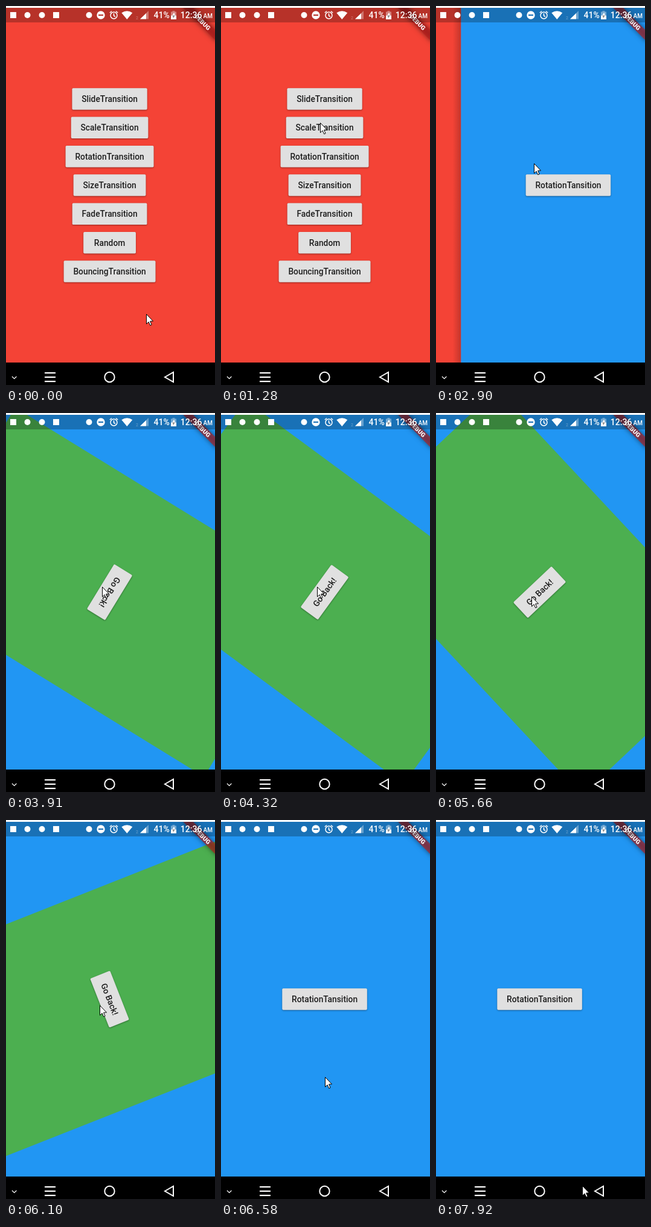
An HTML page with a canvas for the animation above (8 s loop, 346x624 px).

```html
<!DOCTYPE html>
<html lang="en">
<head>
<meta charset="utf-8">
<title>Page transitions</title>
<style>
  html, body { margin: 0; width: 100%; height: 100%; overflow: hidden; background: #fff; }
  canvas { display: block; width: 346px; height: 624px; }
</style>
</head>
<body>
<canvas id="stage"></canvas>
<script>
const W = 346, H = 624, LOOP = 8000;
const STEP = 77;                         // screen refresh while something moves
const DP = 584 / 592;                    // app is 360 x 592 dp
const APP = { x: -6, y: 3, w: 360, h: 592 };
const RED = '#f44336', BLUE = '#2196f3', GREEN = '#4caf50';
const FONT = 'Roboto, sans-serif';
const MENU = [...['Slide', 'Scale', 'Rotation', 'Size', 'Fade'].map(n => n + 'Transition'),
  'Random', 'BouncingTransition'];

const SLIDE = 2900, ENTER = 3750, LEAVE = 5400, GONE = 6420;
const CLICKS = [2500, 3440, 5100];

// Pointer moves: begin, end and the place it stops at
const MOVES = [
  { from: 100, to: 420, x: 208, y: 328 },
  { from: 570, to: 900, x: 165, y: 221 },
  { from: 1280, to: 1540, x: 162, y: 144 },
  { from: 1770, to: 2350, x: 162, y: 259 },
  { from: 3130, to: 3370, x: 159, y: 286 },
  { from: 4390, to: 4550, x: 158, y: 302 },
  { from: 5700, to: 6020, x: 155, y: 305 },
  { from: GONE, to: 7220, x: 197, y: 590 },
  { from: 7620, to: 7920, x: 242, y: 602 }
];

const canvas = document.getElementById('stage');
const ratio = window.devicePixelRatio || 1;
canvas.width = W * ratio;
canvas.height = H * ratio;
const ctx = canvas.getContext('2d');

const clamp = v => Math.max(0, Math.min(1, v));
const stepped = (t, start) => start + Math.floor((t - start) / STEP) * STEP;

// cubic-bezier(.25, .1, .25, 1)
function ease(x) {
  if (x <= 0 || x >= 1) return clamp(x);
  let lo = 0, hi = 1;
  for (let i = 0; i < 24; i++) {
    const u = (lo + hi) / 2;
    if (.75 * u * (1 - u) + u ** 3 < x) lo = u; else hi = u;
  }
  return .3 * lo * (1 - lo) ** 2 + 3 * lo * lo * (1 - lo) + lo ** 3;
}

function pointerAt(t) {
  let x = 232, y = 507;
  for (const move of MOVES) {
    if (t < move.from) break;
    const steps = Math.floor((move.to - move.from) / STEP) + 1;
    const done = Math.floor((t - move.from) / STEP) + 1;
    const k = Math.sin(clamp(done / steps) * Math.PI / 2);
    x += (move.x - x) * k;
    y += (move.y - y) * k;
  }
  return [Math.round(x), Math.round(y)];
}

function saved(draw) {
  ctx.save();
  draw();
  ctx.restore();
}

function shadow(color, blur, dy = 0) {
  ctx.shadowColor = color;
  ctx.shadowBlur = blur * ratio;
  ctx.shadowOffsetY = dy * ratio;
}

function path(...points) {
  ctx.beginPath();
  points.forEach(([x, y]) => ctx.lineTo(x, y));
}

function fillPath(...points) {
  path(...points);
  ctx.fill();
}

function strokePath(...points) {
  path(...points);
  ctx.stroke();
}

function circle(x, y, r) {
  ctx.beginPath();
  ctx.arc(x, y, r, 0, Math.PI * 2);
}

function text(str, x, y, font, align = 'left') {
  ctx.font = `${font} ${FONT}`;
  ctx.textAlign = align;
  ctx.fillText(str, x, y);
}

function button(label, y) {
  ctx.font = `500 14px ${FONT}`;
  const w = Math.max(88, ctx.measureText(label).width + 32);
  saved(() => {
    shadow('rgba(0,0,0,.4)', 2.5, 1);
    ctx.fillStyle = '#e0e0e0';
    ctx.beginPath();
    ctx.roundRect((APP.w - w) / 2, y - 18, w, 36, 2);
    ctx.fill();
  });
  ctx.fillStyle = 'rgba(0,0,0,.87)';
  text(label, APP.w / 2, y + 5, '500 14px', 'center');
}

function page(color, labels) {
  ctx.fillStyle = color;
  ctx.fillRect(0, 0, APP.w, APP.h);
  labels.forEach((label, i) => button(label, APP.h / 2 + (i - (labels.length - 1) / 2) * 48));
}

function slidingPage(t) {
  const dx = 48 * (1 - clamp((stepped(t, SLIDE) - SLIDE) / 240)) ** 2;
  saved(() => {
    ctx.translate(dx, 0);
    if (dx > 0) {
      const edge = ctx.createLinearGradient(-14, 0, 0, 0);
      edge.addColorStop(0, 'rgba(0,0,0,0)');
      edge.addColorStop(1, 'rgba(0,0,0,.2)');
      ctx.fillStyle = edge;
      ctx.fillRect(-14, 0, 14, APP.h);
    }
    page(BLUE, ['RotationTansition']);
  });
}

function rotatingPage(t) {
  const turn = t < LEAVE
    ? ease((stepped(t, ENTER) - ENTER + 97) / 1149)
    : ease((LEAVE + 853 - stepped(t, LEAVE)) / 1050);
  saved(() => {
    ctx.translate(APP.w / 2, APP.h / 2);
    ctx.rotate(turn * Math.PI * 2);
    ctx.translate(-APP.w / 2, -APP.h / 2);
    page(GREEN, ['Go Back!']);
  });
}

function banner() {
  saved(() => {
    ctx.translate(APP.w, 0);
    ctx.rotate(Math.PI / 4);
    saved(() => {
      shadow('rgba(0,0,0,.8)', 8);
      ctx.fillStyle = 'rgba(183,28,28,.627)';
      ctx.fillRect(-40, 28, 80, 12);
    });
    ctx.fillStyle = '#fff';
    text('DEBUG', 0, 37.6, '900 10.2px', 'center');
  });
}

function app(t) {
  saved(() => {
    ctx.beginPath();
    ctx.rect(0, APP.y, W, APP.h * DP);
    ctx.clip();
    ctx.translate(APP.x, APP.y);
    ctx.scale(DP, DP);
    if (t < ENTER) page(RED, MENU);
    if (t >= SLIDE) slidingPage(t);
    if (t >= ENTER && t < GONE) rotatingPage(t);
    banner();
  });
}

function alarmIcon(x, y) {
  ctx.lineWidth = 1.5;
  circle(x, y, 5.5);
  ctx.stroke();
  strokePath([x, y - 3.5], [x, y + .5], [x + 2.5, y + 2]);
  for (const side of [-1, 1]) strokePath([x + side * 6.7, y - 4.3], [x + side * 3.5, y - 7]);
}

function wirelessIcon(x, y) {
  ctx.beginPath();
  ctx.moveTo(x, y);
  ctx.lineTo(x - 9, y - 10.7);
  ctx.quadraticCurveTo(x, y - 16.6, x + 9, y - 10.7);
  ctx.fill();
}

function signalIcon(x, y) {
  for (const [size, alpha] of [[14, .35], [10, 1]]) {
    ctx.fillStyle = `rgba(255,255,255,${alpha})`;
    fillPath([x, y], [x + size, y], [x + size, y - size * .96]);
  }
}

function batteryIcon(x, y) {
  ctx.fillStyle = 'rgba(255,255,255,.4)';
  ctx.fillRect(x + 2.5, y, 4, 1.5);
  ctx.fillRect(x, y + 1.5, 9, 6);
  ctx.fillStyle = '#fff';
  ctx.fillRect(x, y + 7.5, 9, 6.5);
  fillPath([x + 5.3, y + 2.5], [x + 2, y + 8], [x + 7, y + 8]);
  ctx.fillStyle = 'rgba(0,0,0,.45)';
  fillPath([x + 2.5, y + 7.5], [x + 6.8, y + 7.5], [x + 4, y + 12]);
}

function statusBar() {
  ctx.fillStyle = 'rgba(0,0,0,.25)';
  ctx.fillRect(0, 3, W, 24);
  ctx.fillStyle = ctx.strokeStyle = '#fff';

  // notification marks
  for (const x of [12, 83]) ctx.fillRect(x - 5, 10, 10, 10);
  for (const x of [35.5, 59.5, 137.5]) {
    circle(x, 15, 5);
    ctx.fill();
  }

  // do not disturb
  circle(157, 15, 6.7);
  ctx.rect(153, 14, 8, 2);
  ctx.fill('evenodd');

  alarmIcon(178.5, 15.5);
  wirelessIcon(200.3, 22);
  signalIcon(222, 21.5);
  batteryIcon(273, 8);

  ctx.fillStyle = 'rgba(255,255,255,.35)';
  text('2', 215, 22, '7px');
  ctx.fillStyle = '#fff';
  text('41%', 244.5, 20.3, '500 14px');
  text('12:36', 288.8, 20.3, '500 14px');
  text('AM', 326.5, 20.3, '500 10px');
}

function navBar() {
  const y = 611;
  ctx.fillStyle = '#000';
  ctx.fillRect(0, 587, W, 37);
  ctx.fillStyle = ctx.strokeStyle = '#fff';
  ctx.lineWidth = 1.2;
  strokePath([10, y - 1], [13.7, y + 2.7], [17.4, y - 1]);
  for (const dy of [-7, 0, 7]) ctx.fillRect(64, y + dy - 1, 18, 2.2);
  ctx.lineWidth = 2;
  circle(171.5, y, 8.2);
  ctx.stroke();
  path([263, y], [277, y - 8], [277, y + 8]);
  ctx.closePath();
  ctx.stroke();
}

function pointer(t) {
  const [x, y] = pointerAt(t);
  if (CLICKS.some(c => t >= c && t - c < 80)) {
    ctx.lineWidth = 1.2;
    for (const [color, r] of [['#000', 11], ['#fff', 10]]) {
      ctx.strokeStyle = color;
      circle(x, y, r);
      ctx.stroke();
    }
  }
  saved(() => {
    ctx.translate(x + .5, y + .5);
    path([0, 0], [0, 16], [3.6, 12.6], [6.2, 18.3], [8.6, 17.3], [6.1, 11.6], [11, 11.4]);
    ctx.closePath();
    ctx.fillStyle = '#fff';
    ctx.strokeStyle = '#000';
    ctx.lineWidth = 1;
    ctx.fill();
    ctx.stroke();
  });
}

function frame(t) {
  ctx.setTransform(ratio, 0, 0, ratio, 0, 0);
  ctx.fillStyle = '#fff';
  ctx.fillRect(0, 0, W, H);
  app(t);
  statusBar();
  navBar();
  pointer(t);
}

let start;
function tick(now) {
  start ??= now;
  frame((now - start) % LOOP);
  requestAnimationFrame(tick);
}
frame(0);
requestAnimationFrame(tick);
</script>
</body>
</html>
```
